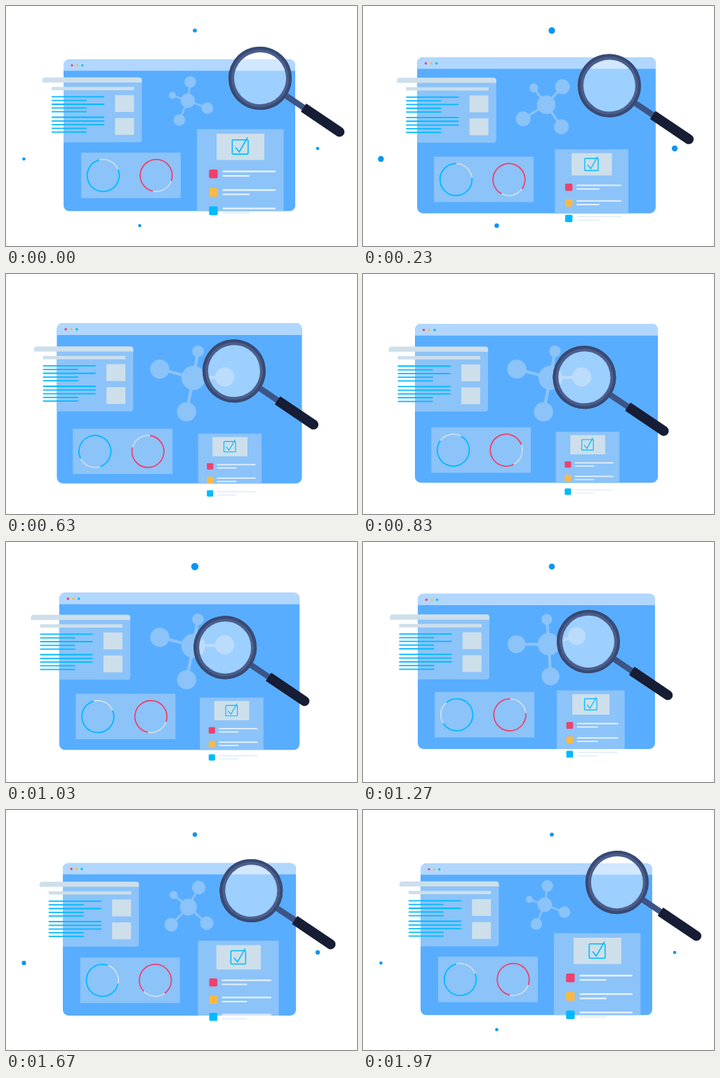
An HTML page with a canvas that plays this animation: 500x342 px, repeating every 2000 ms.

```html
<!DOCTYPE html>
<html lang="en">
<head>
<meta charset="utf-8">
<title>Search dashboard</title>
<style>
html, body { margin: 0; width: 100%; height: 100%; overflow: hidden; background: #fff; }
canvas { display: block; width: 500px; height: 342px; }
</style>
</head>
<body>
<canvas id="stage"></canvas>
<script>
const LOOP = 2000;
const BLUE = '#58adff', HEADER = '#b1d7ff', PANEL = '#8cc3f9', PALE = '#cddfeb', LINE = '#e6f0fa';
const CYAN = '#00baff', RED = '#ee426d', ORANGE = '#fbb943', DOT = '#0c96f2';

const canvas = document.getElementById('stage');
const ctx = canvas.getContext('2d');
const ratio = window.devicePixelRatio || 1;
canvas.width = 500 * ratio;
canvas.height = 342 * ratio;

// Cubic bezier easing from (0,0) to (1,1) with flat ends
function ease(x, x1, x2) {
  if (x <= 0) return 0;
  if (x >= 1) return 1;
  let lo = 0, hi = 1, s;
  for (let i = 0; i < 24; i++) {
    s = (lo + hi) / 2;
    const at = 3 * (1 - s) ** 2 * s * x1 + 3 * (1 - s) * s * s * x2 + s ** 3;
    if (at < x) lo = s; else hi = s;
  }
  return s * s * (3 - 2 * s);
}

// Rises to 1 at `peak`, holds until `drop`, returns to 0 at the end of the loop
function swing(t, peak, drop = peak, up = [.167, .667], down = [.333, .667]) {
  return t < drop ? ease(t / peak, ...up) : 1 - ease((t - drop) / (LOOP - drop), ...down);
}

function rect(x, y, w, h, color, radius = 0) {
  ctx.fillStyle = color;
  ctx.beginPath();
  ctx.roundRect(x, y, w, h, radius);
  ctx.fill();
}

function disc(x, y, r, color) {
  ctx.fillStyle = color;
  ctx.beginPath();
  ctx.arc(x, y, r, 0, 7);
  ctx.fill();
}

function ring(x, y, r, width, color, from = 0, to = Math.PI * 2) {
  ctx.strokeStyle = color;
  ctx.lineWidth = width;
  ctx.beginPath();
  ctx.arc(x, y, r, from, to);
  ctx.stroke();
}

function group(x, y, scale, angle, draw) {
  ctx.save();
  ctx.translate(x, y);
  ctx.rotate(angle);
  ctx.scale(scale, scale);
  draw();
  ctx.restore();
}

function windowFrame() {
  rect(-165, -108, 330, 216, BLUE, 8);
  rect(-165, -108, 330, 16, HEADER, [8, 8, 0, 0]);
  [RED, ORANGE, CYAN].forEach((c, i) => disc(-153 + i * 7.4, -99.7, 1.7, c));
}

function textPanel() {
  rect(0, 0, 141.5, 7.3, PALE, [4, 4, 0, 0]);
  rect(13, 13.5, 117.5, 4.8, PALE);
  rect(103.3, 25.3, 27, 24, PALE);
  rect(103.3, 58, 27, 24, PALE);
  [27.7, 56.8].forEach((top, g) => {
    for (let i = 0; i < 5; i++) {
      const long = g ? i < 3 : i % 2 == 0 && i < 4;
      rect(13, top + i * 5.3 - .9, long ? 75 : 50, 1.8, CYAN);
    }
  });
}

function dials(turn) {
  const gap = 82 * Math.PI / 180;
  [[31.5, CYAN, -104], [107, RED, 20]].forEach(([x, color, deg]) => {
    const start = deg * Math.PI / 180 + turn;
    ring(x, 32.5, 22.8, 1.8, PALE, start, start + gap);
    ring(x, 32.5, 22.8, 1.8, color, start + gap, start + Math.PI * 2);
  });
}

function checklist() {
  rect(28, 6.5, 68, 37.5, PALE);
  ctx.strokeStyle = CYAN;
  ctx.lineWidth = 1.6;
  ctx.beginPath();
  ctx.roundRect(50.3, 15.2, 22.6, 20.4, 1);
  ctx.moveTo(55, 26);
  ctx.lineTo(60.3, 32.5);
  ctx.lineTo(72, 12);
  ctx.stroke();
  [RED, ORANGE, CYAN].forEach((c, i) => {
    const y = 57.5 + i * 26.3;
    rect(17.2, y, 12.4, 12.4, c, 2);
    rect(36.5, y + 1.6, 75.5, 2.5, LINE, 1);
    rect(36.5, y + 8, 38.5, 2.3, LINE, 1);
  });
}

function molecule() {
  ctx.strokeStyle = PANEL;
  ctx.lineWidth = 2.6;
  [[-22, -7.5, 5], [3.5, -26.8, 8.3], [-12, 27.5, 8.3], [28, 10.5, 8.3]].forEach(([x, y, r]) => {
    ctx.beginPath();
    ctx.moveTo(0, 0);
    ctx.lineTo(x, y);
    ctx.stroke();
    disc(x, y, r, PANEL);
  });
  disc(0, 0, 10.4, PANEL);
}

function magnifier() {
  rect(44, -4.2, 32, 8.4, '#3c5586');
  rect(74.5, -7, 69, 14, '#161d34', [1, 7, 7, 1]);
  disc(0, 0, 38, 'rgba(255,255,255,.41)');
  ring(0, 0, 41, 8, '#4b5e8c');
  ring(0, 0, 43, 4, '#384a74');
}

function draw(t) {
  const grow = swing(t, 533, 533, [.167, .667], [.167, .64]);
  const slide = swing(t, 1000);
  const shrink = swing(t, 467, 1000);
  const spin = swing(t, 600, 1000);
  const turn = swing(t, 1000, 1000, [.7, .667], [.333, .3]) * Math.PI * 2;
  const late = swing(t, 1330);
  const zoom = 1 + .06 * grow;

  const text = [52 - 16.5 * slide, 101.7 + 2 * slide];
  const dial = [107 - 12.2 * grow, 209 + 11.8 * grow];
  const list = [272 - 7.5 * grow + 8.8 * shrink, 175.5 + 16.5 * grow + 36 * shrink];
  const listScale = 1 - .267 * shrink;

  ctx.setTransform(ratio, 0, 0, ratio, 0, 0);
  ctx.fillStyle = '#fff';
  ctx.fillRect(0, 0, 500, 342);

  // Each dot swells and is gone above its limit
  [[269, 35, 2.8, 3.8, grow, .76], [25.5, 218, 2.3, 3.3, shrink, .65],
   [444, 203, 2.3, 3.3, shrink, .65], [190.5, 313, 2.3, 6, late, .43]]
    .forEach(([x, y, r, gain, k, limit]) => k < limit && disc(x, y, r + gain * k, DOT));

  group(247, 184.3, zoom, 0, windowFrame);

  // Panel bodies show only inside the window
  ctx.save();
  ctx.beginPath();
  ctx.roundRect(247 - 165 * zoom, 184.3 - 108 * zoom, 330 * zoom, 216 * zoom, 8);
  ctx.clip();
  rect(...text, 141.5, 92.5, PANEL, 4);
  rect(...dial, 142, 64.7, PANEL);
  rect(...list, 123.5 * listScale, 150, PANEL);
  ctx.restore();

  group(...text, 1, 0, textPanel);
  group(...dial, 1, 0, () => dials(turn));
  group(...list, listScale, 0, checklist);
  group(259 + 8 * spin ** 1.7, 135 + 13 * spin, 1 + .65 * spin, spin * 81 * Math.PI / 180, molecule);
  group(362 - 50 * slide, 103 + 47.5 * slide, 1, 34 * Math.PI / 180, magnifier);
}

const begin = performance.now();
function tick() {
  draw((performance.now() - begin) % LOOP);
  requestAnimationFrame(tick);
}
tick();
</script>
</body>
</html>
```
